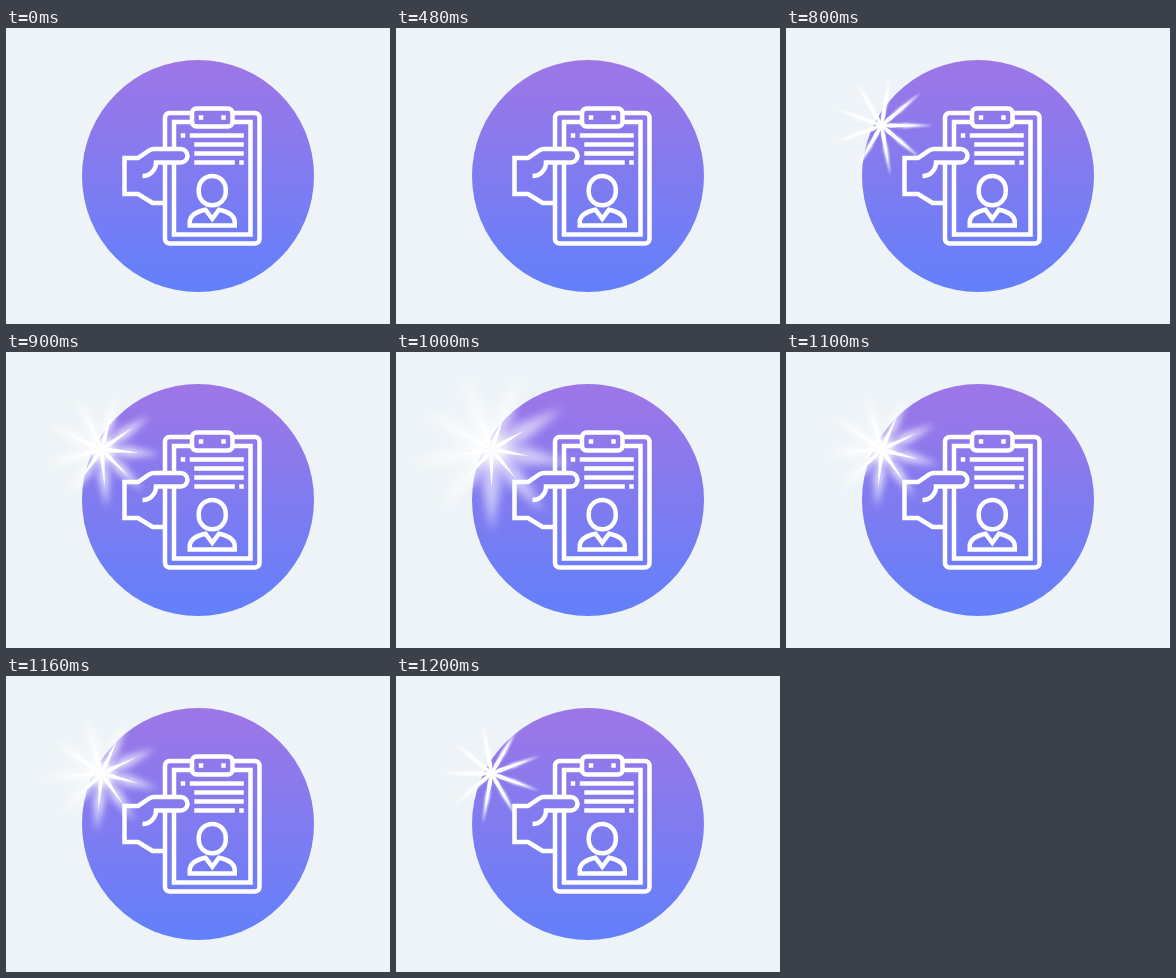
Recreate the animation shown at these times as an HTML page. Size 384 px wide and 296 px high, loop 1.3 s.

```html
<!DOCTYPE html>
<html lang="en">
<head>
<meta charset="utf-8">
<title>Clipboard with sparkle</title>
<style>
  html, body { margin: 0; width: 100%; height: 100%; overflow: hidden; background: #edf3f7; }
  svg { display: block; width: 384px; height: 296px; }
  .lines { fill: none; stroke: #fff; stroke-width: 2; }
  .backdrop { fill: url(#sky); }
  .dots, #sparkle { fill: #fff; }
</style>
</head>
<body>
<svg viewBox="0 0 384 296">
  <defs>
    <linearGradient id="sky" gradientUnits="userSpaceOnUse" x1="192" y1="32" x2="192" y2="264">
      <stop offset="0" stop-color="#9e76e6"/>
      <stop offset="1" stop-color="#6280fa"/>
    </linearGradient>
    <filter id="soft" filterUnits="userSpaceOnUse" x="-110" y="-110" width="220" height="220">
      <feGaussianBlur id="blur"/>
    </filter>
    <filter id="coreSoft" filterUnits="userSpaceOnUse" x="-60" y="-60" width="120" height="120">
      <feGaussianBlur id="coreBlur"/>
    </filter>
    <!-- clip and thumb hide the board edge behind them -->
    <mask id="behind" maskUnits="userSpaceOnUse" x="0" y="0" width="64" height="64">
      <path fill="#fff" d="M0 0H64V64H0z"/>
      <rect x="32" y="2" width="18" height="8" rx="2"/>
      <path d="M15 20H27a3 3 0 0 1 0 6H15z"/>
    </mask>
  </defs>

  <circle class="backdrop" cx="192" cy="148" r="116"/>

  <!-- icon on a 64-unit grid -->
  <g transform="translate(114 76) scale(2.25)">
    <g class="lines">
      <g mask="url(#behind)">
        <rect x="20" y="4" width="42" height="58" rx="2"/>
        <rect x="24" y="8" width="34" height="50"/>
      </g>
      <rect x="32" y="2" width="18" height="8" rx="2"/>
      <path d="M31 14H55M33 18H55M33 22H55M33 26H51"/>
      <!-- portrait -->
      <path d="M35 38a6 6 0 0 1 12 0v1a6 6 0 0 1-12 0z"/>
      <path d="M38 47C33.500 48 31 49.500 31 52.500V54H51V52.500C51 49.500 48.500 48 44 47L41 51z"/>
      <!-- hand -->
      <path d="M20 44H14.500L8 40H2V24H8L13 20.600Q14 20 15 20H27a3 3 0 0 1 0 6H16a6 6 0 0 1-6 6"/>
    </g>
    <path class="dots" d="M35 5h2v2h-2zM45 5h2v2h-2zM27 13h2v2h-2zM53 25h2v2h-2z"/>
  </g>

  <g id="sparkle" transform="translate(95.500 97.500)">
    <g id="rays">
      <path id="glow" filter="url(#soft)"/>
      <path id="spikes"/>
    </g>
    <circle id="core" filter="url(#coreSoft)"/>
  </g>
</svg>

<script>
  const LOOP = 1300, START = 800, STEP = 100, RAYS = 9;
  const el = id => document.getElementById(id);
  const set = (id, attrs) => {
    for (const name in attrs) el(id).setAttribute(name, attrs[name]);
  };

  // Nine kite-shaped rays, widest at the given distance from the centre.
  function star(length, width, widest) {
    let d = '';
    for (let i = 0; i < RAYS; i++) {
      const angle = i * 2 * Math.PI / RAYS, c = Math.cos(angle), s = Math.sin(angle);
      const point = (x, y) => `${(x * c - y * s).toFixed(2)} ${(x * s + y * c).toFixed(2)}`;
      d += `M0 0L${point(widest, -width / 2)}L${point(length, 0)}L${point(widest, width / 2)}Z`;
    }
    return d;
  }

  set('spikes', { d: star(38, 4.5, 9) });

  let shown = null;
  function draw(time) {
    const step = Math.floor((time % LOOP - START) / STEP);
    if (step !== shown) {
      shown = step;
      el('sparkle').style.display = step < 0 ? 'none' : '';
      if (step >= 0) {
        const power = 1 - Math.abs(step - 2) / 2;
        const softness = Math.sqrt(power);
        set('rays', { transform: `rotate(${step * 5})` });
        set('glow', {
          d: star(51 + 31 * power ** 2, 4.5 + 14 * power, 24 + 10 * power ** 2),
          opacity: 1 - 0.4 * softness
        });
        set('blur', { stdDeviation: 0.8 + 4.2 * softness });
        set('core', { r: 6 + 12 * power });
        set('coreBlur', { stdDeviation: 1.3 + 7 * power });
      }
    }
    requestAnimationFrame(now => draw(now - begin));
  }

  const begin = performance.now();
  draw(0);
</script>
</body>
</html>
```
